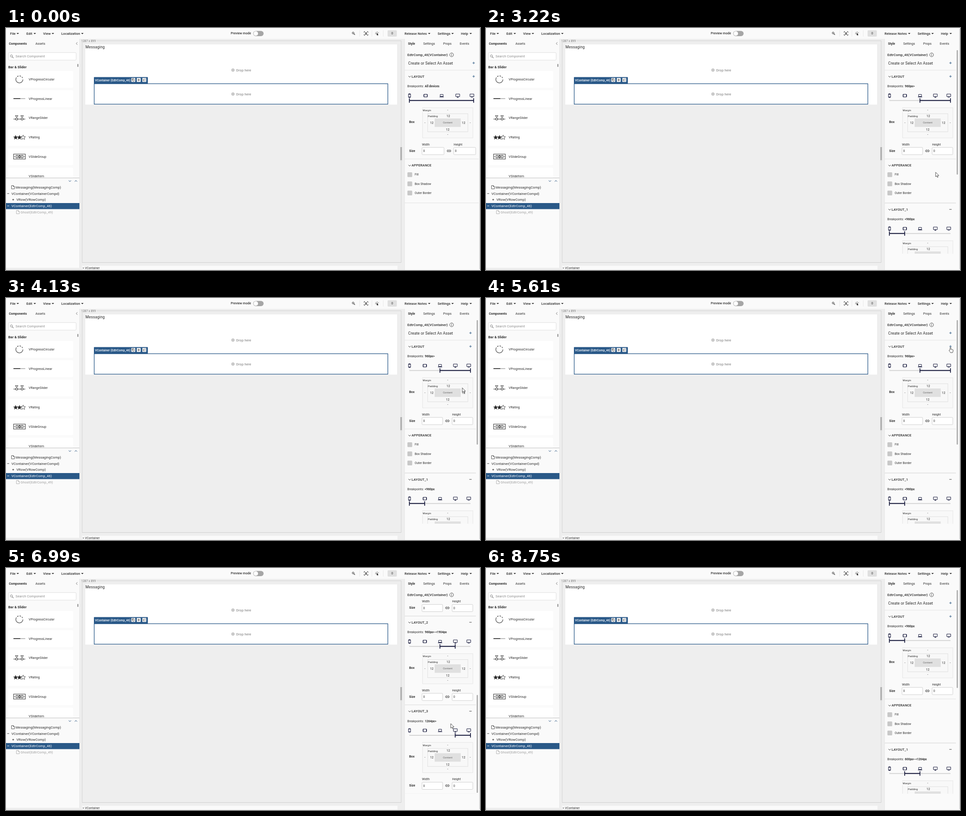
These frames come from a looping animation (1046 by 535 pixels, 9460 ms). An HTML page:

```html
<!DOCTYPE html>
<html lang="en">
<head>
<meta charset="utf-8">
<title>Layout breakpoints</title>
<style>
html, body { margin: 0; width: 100%; height: 100%; overflow: hidden; background: #eee; }
svg { display: block; width: 1046px; height: 535px; font-family: Roboto, Arial, sans-serif; letter-spacing: .06px; }
text { white-space: pre; }
</style>
</head>
<body>
<svg id="stage" viewBox="0 0 1046 535"></svg>
<script>
const LOOP = 9460, S = 6.42, M = 6.95, L = 7.49, XL = 8.56;
const INK = '#2b2b2b', NAVY = '#14173a', BLUE = '#2a5988', LINE = '#dcdcdc';
const MED = 'font-weight="500"', BOLD = 'font-weight="700"', MID = 'text-anchor="middle"';

// y is the middle of the capitals
const text = (x, y, s, size = S, attr = '', fill = INK) =>
  `<text x="${x}" y="${y + size * .355}" font-size="${size}" fill="${fill}" ${attr}>${s.replace(/&/g, '&amp;').replace(/</g, '&lt;')}</text>`;
const rect = (x, y, w, h, fill = 'none', attr = '') =>
  `<rect x="${x}" y="${y}" width="${w}" height="${h}" fill="${fill}" ${attr}/>`;
const path = (d, stroke = INK, width = 1, attr = '') =>
  `<path d="${d}" fill="none" stroke="${stroke}" stroke-width="${width}" ${attr}/>`;
const shape = (d, fill = INK) => `<path d="${d}" fill="${fill}"/>`;
const circle = (x, y, r, fill, attr = '') => `<circle cx="${x}" cy="${y}" r="${r}" fill="${fill}" ${attr}/>`;
const at = (x, y, s) => `<g transform="translate(${x} ${y})">${s}</g>`;
const plus = (x, y, r = 2.6, c = '#1f4e7c') => path(`M${x - r} ${y}h${2 * r}M${x} ${y - r}v${2 * r}`, c, .9);
const minus = (x, y, r = 2.6) => path(`M${x - r} ${y}h${2 * r}`, INK, .9);
const chevron = (x, y, k = 1, c = INK) => path(`M${x - 2.6} ${y - 1.3 * k}l2.6 ${2.6 * k}l2.6 ${-2.6 * k}`, c, 1);
const page = (x, y, c) => path(`M${x} ${y - 3.7}h4l2.4 2.4v5h-6.4zM${x + 4} ${y - 3.7}v2.4h2.4`, c, .8);

function topBar() {
  const menus = [['File', 9, 26], ['Edit', 45, 63.5], ['View', 82, 103.5], ['Localization', 122, 168.5],
    ['Release Notes', 879.5, 934], ['Settings', 952.5, 985.5], ['Help', 1004, 1025.5]];
  return rect(0, 0, 1046, 24, '#fafafa') +
    menus.map(([s, x, c]) => text(x, 12, s, L, MED) + shape(`M${c - 2.6} 11h5.2l-2.6 2.7z`)).join('') +
    text(496, 12, 'Preview mode', M, MED) +
    rect(545.5, 6.5, 23, 11.5, '#a6a6a6', 'rx="5.75"') + circle(551.3, 12.2, 4.9, '#fff') +
    circle(766, 11, 2, 'none', `stroke="${INK}"`) + path('M767.5 12.5l2.5 2.6', INK, 1.2) +
    path('M780.5 5v14M807.5 5v14M832.5 5v14', '#e4e4e4', .8) +
    path('M790.3 10v-2h2M796.7 8h2v2M798.7 14v2h-2M792.3 16h-2v-2', INK, 1) +
    circle(794.5, 11, 1.6, INK) + shape('M791.7 14.5q2.8-3.4 5.6 0z') +
    path('M819 8v2M815.5 9.5l1.5 1.5M822.5 9.5l-1.4 1.3M814.8 12.6h2', INK, .9) + shape('M818 10.8l4.2 3.4-2 .3 1 2-1 .5-1-2-1.2 1.3z') +
    rect(842, 5, 20.5, 14, '#e0e0e0', 'rx="2"') + text(852.2, 12, '0', M, MID);
}

function listIcons() {
  const star = x => `M${x} 236.6l1.5 3.4 3.8.3-2.9 2.5.9 3.6-3.3-2-3.3 2 .9-3.6-2.9-2.5 3.8-.3z`;
  const knob = x => path(`M${x - 3} 193.8h6l-3 4zM${x - 2} 199.3h4v4h-4z`, INK, 1);
  return circle(29.5, 113.7, 7.8, 'none', `stroke="${INK}" stroke-width="1.1" stroke-dasharray="29 2.5 3 2.5 3 2.5 3 3.5"`) +
    path('M16.5 156.2h26', '#aaa', 1.6) + path('M16.5 156.2h15', INK, 1.6) +
    path('M16.5 201.3h5M25.5 201.3h8M37.5 201.3h5', INK, 1) + knob(23.5) + knob(35.5) +
    shape(star(21.3)) + shape(star(29.6)) + path(star(37.8), INK, .8) +
    rect(16.7, 278.8, 26, 11, 'none', `stroke="${INK}" stroke-width="1"`) +
    path('M20 282.5l-1.4 1.8 1.4 1.8M39.4 282.5l1.4 1.8-1.4 1.8M22.3 281.6h3.6v5.6h-3.6zM28 281.6h3.8v5.6h-3.8zM33.8 281.6h3.6v5.6h-3.6z', INK, 1) +
    shape('M28.5 282h2.8l-1.4 2.3zM28.5 286.8h2.8l-1.4-2.3z');
}

function leftSide() {
  const names = ['VProgressCircular', 'VProgressLinear', 'VRangeSlider', 'VRating', 'VSlideGroup', 'VSlideItem'];
  const cards = names.map((s, i) => {
    const y = 113.6 + i * 42.7;
    return rect(5, y - 18.5, 143, 37, '#fff', 'rx="2"') + text(50, y, s, M);
  }).join('');
  const tree = 'letter-spacing=".09"';
  return rect(0, 24, 162, 506, '#fafafa') + rect(162, 24, .8, 506, '#e0e0e0') +
    text(6.5, 34.3, 'Components', 6.8, BOLD) + text(65, 34.3, 'Assets', M) +
    path('M157.5 31.5l-2.6 2.8l2.6 2.8', '#666', .9) +
    rect(5.3, 54.3, 149.5, 16.8, '#fff', 'stroke="#d2d2d2" stroke-width=".7" rx="2"') +
    circle(12, 61.8, 2.4, 'none', 'stroke="#777" stroke-width=".9"') + path('M13.8 63.7l2.7 2.8', '#777', 1.1) +
    text(21, 62.8, 'Search Component', L, '', '#8a8a8a') +
    text(5, 86.5, 'Bar & Slider', L, BOLD) + rect(157.3, 79.5, 2.6, 6.5, '#9e9e9e', 'rx="1"') +
    `<g clip-path="url(#list)">${cards}${listIcons()}</g>` +
    rect(0, 331, 162, .9, '#bbb') + chevron(141, 338.3, 1, '#1f4e7c') + chevron(154.3, 338.3, -1, '#1f4e7c') +
    rect(0, 387, 162, 13.4, BLUE) +
    page(12.2, 352, INK) + text(21, 352.2, 'Messaging(MessagingComp)', L, tree) +
    minus(4.8, 366, 2.2) + text(12, 366, 'VContainer(VContainerCompd)', L, tree) +
    plus(15.8, 379.5, 2, INK) + text(23, 379.7, 'VRow(VRowComp)', L, tree) +
    path('M2.6 393.3h4.4', '#fff', .9) + text(12, 393.4, 'VContainer(EdtrComp_46)', L, tree, '#fff') +
    page(23, 407, '#a0a0a0') + text(32, 407.2, 'Ghost(EdtrComp_49)', L, tree, '#a0a0a0');
}

function centre() {
  const drop = y => circle(500.8, y, 2.9, 'none', 'stroke="#757575" stroke-width=".8"') +
    circle(500.8, y, 1.1, '#757575') + text(508, y, 'Drop here', L, 'letter-spacing=".1"', '#757575');
  return path('M200 28.2h672v234M872 293v225.5h-704v-488', '#c9c9c9', .8) + text(166, 28.3, '1287 x 899', S, '', '#777') +
    rect(175, 36.3, 688, 133, '#fff') + text(175.3, 42.3, 'Messaging', XL, 'letter-spacing=".09"') +
    drop(93) + drop(146) +
    rect(194.6, 123.2, 648, 45.2, 'none', `stroke="${BLUE}" stroke-width="1.3"`) +
    rect(194, 108.6, 119, 14.6, BLUE, 'rx="1"') +
    text(196.5, 115.6, 'VContainer (EdtrComp_46)', S, MED, '#fff') +
    [276.6, 288.6, 300.8].map(x => rect(x, 110.6, 8.6, 8.6, '#fff', 'rx="1"')).join('') +
    path('M279.7 113h3.2v4.4h-3.2zM278.6 116v-4h3', INK, .7) + plus(292.9, 114.9, 2.8, INK) +
    path('M303 112.5v4.6h1.6M303 114.5h1.6M305.6 112.7h2M305.6 114.6h2M305.6 117h2', INK, .8) +
    rect(168, 525.5, 696, 8.6, '#fafafa') + text(169, 530.4, '> VContainer', S, 'letter-spacing=".1"') +
    rect(870, 263, 4, 29.5, '#bdbdbd') + path('M871.9 264v27.5', '#999', .8);
}

function rightSide() {
  return rect(879, 24, 167, 511, '#fafafa') + rect(879, 24, .7, 511, '#ddd') +
    text(895, 34.3, 'Style', 6.8, BOLD + MID.padStart(21)) +
    [['Settings', 933.7], ['Props', 974], ['Events', 1011.6]].map(([s, x]) => text(x, 34.3, s, M, MID)).join('') +
    text(885.7, 59.2, 'EdtrComp_46(VContainer)', L, MED) +
    circle(983.4, 59.3, 4.2, 'none', `stroke="${INK}" stroke-width=".8"`) + path('M983.4 58.5v3M983.4 56.6v1', INK, .9);
}

const devices = [
  rect(-2.3, -4, 4.6, 8, 'none', `stroke="${NAVY}" stroke-width="1" rx=".6"`) + path('M-2.3-3h4.6M-2.3 3h4.6', NAVY, 1),
  rect(-4, -3, 8, 6, 'none', `stroke="${NAVY}" stroke-width="1" rx=".6"`) + path('M-3.3-3v6M3.3-3v6', NAVY, 1),
  path('M-3.2 2v-4.6h6.4v4.6zM-4.7 3h9.4', NAVY, 1),
  path('M-4.3-3.5h8.6v5.6h-8.6zM-2 4h4M0 2v2', NAVY, 1),
  path('M-4.3-3.5h8.6v5.6h-8.6zM-2.3 3.6h4.6', NAVY, 1)
];

// Everything below is placed relative to the section heading
function section(name, [from, to, range], wide, first) {
  const end = wide ? 1032 : 1025, stop = i => 890.2 + i * (end - 890.2) / 4;
  const w = wide ? 48.6 : 45.6, x2 = wide ? 988 : 984.5, link = wide ? 977.5 : 974;
  const field = x => rect(x, 157, w, 16, '#fff', 'stroke="#c4c4c4" stroke-width=".8" rx="1.5"') + text(x + 2.7, 165, '0');
  const num = (x, y, s) => text(x, y, s, M, MID);
  return rect(880, -14.3, wide ? 163 : 157, .8, LINE) + chevron(890.7, .4) +
    text(895, .3, name, L, MED + ' letter-spacing=".14"') + (first ? plus(end, 0) : minus(end, 0)) +
    text(885.7, 21.8, 'Breakpoints:') + text(924.3, 21.8, range, S, BOLD) +
    devices.map((d, i) => at(i == 4 ? end - 3.8 : stop(i) + .3, 42.5, d)).join('') +
    path(`M890 53.3H${end}`, '#cfcfcf', 1.7) + path(`M${stop(from)} 53.3H${stop(to)}`, NAVY, 1.9) +
    path(`M${stop(from)} 48.3v10M${stop(to)} 48.3v10`, NAVY, 1.7) +
    rect(919.2, 69.2, 111, 66.8, '#f8f8f8', 'stroke="#ddd" stroke-width=".7"') + rect(930.6, 82.5, 88.6, 39.8, '#f8f8f8', 'stroke="#d6d6d6" stroke-width=".7"') +
    rect(946, 93, 57.5, 18.7, '#e0e0e0') + text(974.7, 102.4, 'Content', 5.9, MID, '#666') +
    rect(918.8, 71, 20.5, 8, '#fafafa') + text(919.6, 75, 'Margin', 5.9) + text(931, 88.4, 'Padding', 5.9) +
    num(974.7, 75, '-') + num(924.6, 102.2, '-') + num(1024.6, 102.2, '-') + num(974.7, 128.5, '-') +
    num(976, 87.2, '12') + num(939.6, 102.4, '12') + num(1009.8, 102.4, '12') + num(974.8, 117.8, '12') +
    text(889.8, 100.4, 'Box', 6.7, BOLD) + text(889.8, 164.4, 'Size', 6.7, BOLD) +
    text(918, 150.6, 'Width') + text(x2, 150.6, 'Height') + field(918) + field(x2) +
    path(`M${link - .6} 162.7h-1.4a2 2 0 0 0 0 4h1.4M${link + .6} 162.7h1.4a2 2 0 0 1 0 4h-1.4M${link - 1.6} 164.7h3.2`, INK, 1) +
    rect(880, 182.3, wide ? 163 : 157, .8, LINE);
}

const states = [
  [[0, 4, 'All devices']],
  [[0, 2, '<1264px'], [2, 4, '960px>']],
  [[2, 4, '960px>'], [0, 1, '<960px'], [1, 2, '600px> <1264px']],
  [[0, 1, '<960px'], [1, 2, '600px> <1264px'], [2, 3, '960px> <1904px'], [3, 4, '1264px>']]
];
const clicks = [1030, 2430, 5720];

function styles(state) {
  const wide = state == 0;
  const parts = states[state].map((r, i) =>
    at(0, i ? 401 + 196.5 * (i - 1) : 107, section(i ? 'LAYOUT_' + i : 'LAYOUT', r, wide, !i)));
  const checks = ['Fill', 'Box Shadow', 'Outer Border'].map((s, i) => {
    const y = 324.2 + 20.3 * i;
    return rect(885.8, y - 5.3, 10.6, 10.6, '#c8c8c8', 'rx="1.5"') + text(902, y, s, S, 'letter-spacing=".08"');
  });
  return text(887.5, 78, 'Create or Select An Asset', XL, 'letter-spacing=".09"') + plus(wide ? 1032 : 1025, 77.3) +
    parts.join('') + chevron(890.7, 304) + text(895, 303.8, 'APPERANCE', L, MED + ' letter-spacing=".12"') +
    checks.join('') + rect(880, 386.3, wide ? 163 : 157, .8, LINE);
}

const arrow = '<path d="M0 0v10l2.3-2.1 1.5 3.5 1.7-.7-1.5-3.4h3.2z" fill="#fff" stroke="#222" stroke-width=".8"/>';
const hand = '<path d="M-1 6V1a1 1 0 0 1 2 0v3.4l4 .8q1 .3.9 1.5l-.6 3.3-.7 1.8h-4.6q-1.2-2.2-3-4.2-.5-1.4.8-1.4z" fill="#fff" stroke="#222" stroke-width=".8"/>';

const stage = document.getElementById('stage');
stage.innerHTML = `<defs><clipPath id="list">${rect(0, 91, 162, 240)}</clipPath><clipPath id="view">${rect(879, 68, 166, 431)}</clipPath></defs>` +
  topBar() + leftSide() + centre() + rightSide() + rect(1044.8, 2, .8, 531, '#b5b5b5') +
  '<g clip-path="url(#view)"><g id="styles"></g></g><rect id="thumb" x="1038.7" width="2.6" rx="1" fill="#a9a9a9"/><g id="cursor"></g>';
const [panel, thumb, cursor] = ['styles', 'thumb', 'cursor'].map(id => document.getElementById(id));

// Keys are [time, value, ...]
const scrollKeys = [[3380, 0], [3640, 281], [3790, 281], [4100, 0], [6190, 0], [6720, 477.5], [7260, 477.5], [7740, 0]];
const cursorKeys = [[60, 1022, 511], [870, 1035.5, 103.5], [1400, 1035.5, 103.5], [1550, 1034, 105], [1740, 1034, 105],
  [1870, 1027.5, 108.5], [2560, 1027.5, 108.5], [3350, 989.5, 335], [3750, 989.5, 335], [4300, 1012, 159],
  [5230, 1026, 104], [5300, 1026, 104], [5500, 1025, 109], [5800, 1025, 109], [6230, 982, 335], [6700, 981.5, 344],
  [7110, 981.5, 344], [7260, 981.5, 346], [7700, 982.5, 390.5], [7910, 987, 414], [8240, 987, 414], [8750, 1023, 537]];

function tween(keys, t) {
  const i = keys.findIndex(k => k[0] > t);
  if (i < 1) return keys.at(i).slice(1);
  const [a, b] = [keys[i - 1], keys[i]], p = (t - a[0]) / (b[0] - a[0]), e = p * p * (3 - 2 * p);
  return a.slice(1).map((v, j) => v + (b[j + 1] - v) * e);
}

let shownState, shownCursor;
function draw() {
  const t = performance.now() % LOOP;
  const state = clicks.filter(c => t >= c).length;
  if (state != shownState) panel.innerHTML = styles(shownState = state);

  const [scroll] = tween(scrollKeys, t), total = 338 + 196.5 * state;
  panel.setAttribute('transform', `translate(0 ${-scroll})`);
  thumb.setAttribute('y', 49 + scroll * 450 / total);
  thumb.setAttribute('height', state ? 450 * 450 / total - 2 : 0);

  const [x, y] = tween(cursorKeys, t);
  const over = Math.abs(x - (state ? 1025 : 1032)) < 5 && Math.abs(y - 107) < 7;
  const pointer = t < 60 || t >= 8750 ? '' : over ? hand : arrow;
  if (pointer !== shownCursor) cursor.innerHTML = shownCursor = pointer;
  cursor.setAttribute('transform', `translate(${x} ${y})`);
  requestAnimationFrame(draw);
}
draw();
</script>
</body>
</html>
```
